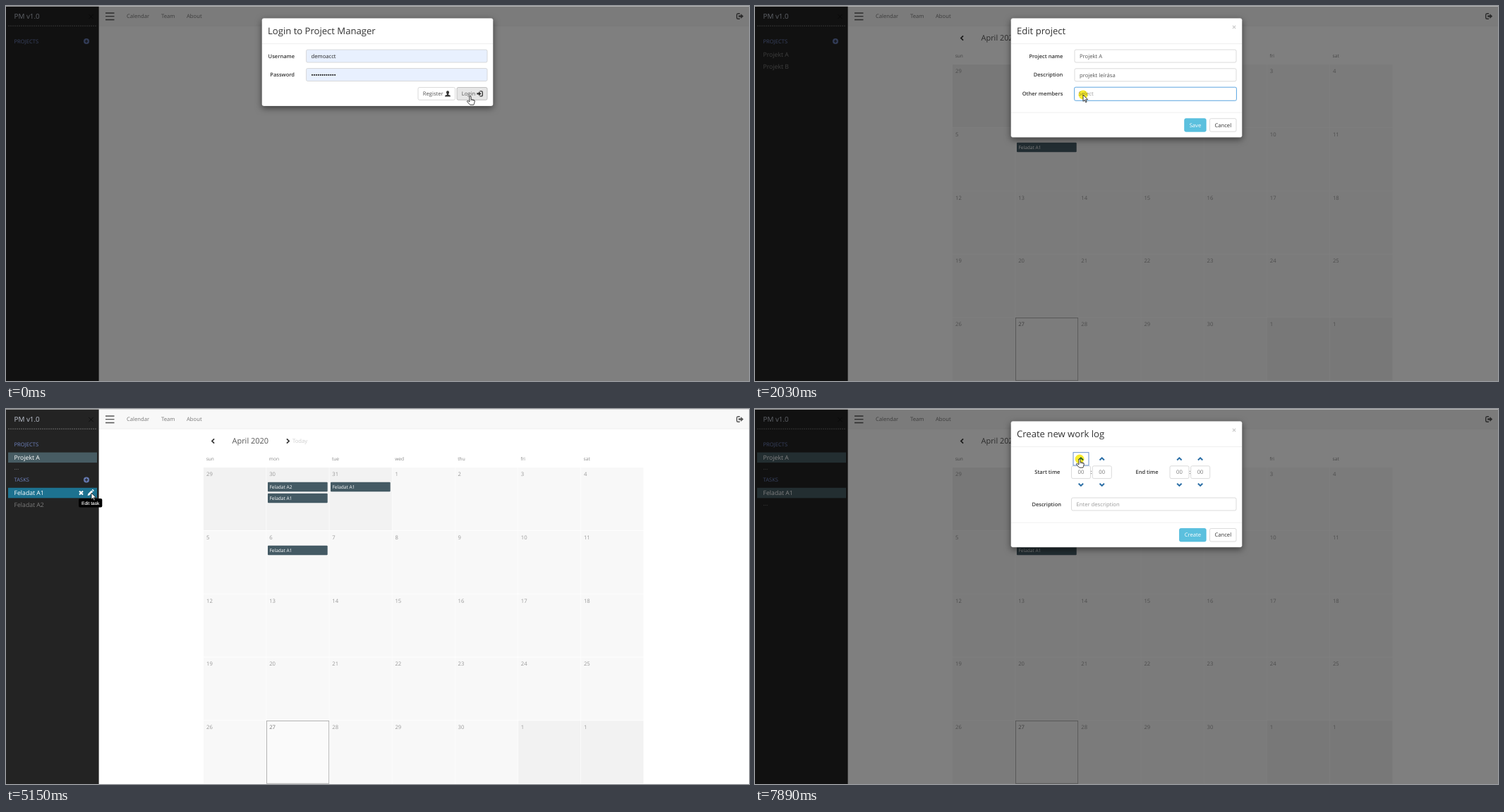
An HTML page for the animation above (8000 ms loop, 1053 by 532 pixels).

```html
<!DOCTYPE html>
<html lang="en">
<head>
<meta charset="utf-8">
<title>Project manager</title>
<style>
html, body { margin: 0; width: 100%; height: 100%; overflow: hidden; background: #fff; }
svg { display: block; width: 1053px; height: 532px; font-family: "Open Sans", sans-serif; text-rendering: geometricPrecision; }
</style>
</head>
<body>
<svg id="stage" viewBox="0 0 1053 532" xmlns="http://www.w3.org/2000/svg"></svg>
<script>
const stage = document.getElementById('stage');
const LOOP = 8000;
const MEMBER = 'tolvidor';

// Screen updates come in bursts: [first, last, number of updates]
const BURSTS = [
  [0, 0, 1], [90, 160, 2], [340, 490, 3], [650, 980, 5], [1120, 1120, 1], [1300, 1700, 6],
  [2030, 2340, 5], [2570, 2970, 6], [3110, 3670, 8], [3820, 3900, 2], [4280, 5070, 11],
  [5150, 5780, 9], [6240, 6870, 9], [7020, 7020, 1], [7180, 7180, 1], [7340, 7890, 8]
];

// Pointer path: time, x, y
const PATH = [
  [0, 658, 128], [570, 658, 128], [980, 121, 69], [1460, 121, 69], [1700, 465, 126],
  [2500, 465, 126], [2810, 478, 145], [3110, 478, 145], [3430, 620, 168], [3510, 620, 168],
  [3670, 60, 70], [4200, 60, 70], [4800, 121, 119], [5465, 121, 119], [5780, 663, 166],
  [6319, 663, 166], [6476, 644, 169], [6634, 60, 119], [6715, 60, 119], [6870, 495, 222],
  [7497, 495, 222], [7811, 460, 71]
];
const CLICKS = [[90, 160], [1120, 1300], [2030, 2180], [2880, 2960], [3820, 3890], [4900, 5060],
  [6240, 6310], [6700, 6780], [7020, 7180], [7880, 8000]];
const HANDS = [[0, 640], [2800, 3580], [3670, 4280], [5700, 6390], [6630, 6780], [7800, 8000]];

const clamp = v => Math.max(0, Math.min(1, v));
const within = (list, t) => list.some(([a, b]) => t >= a && t < b);

function screenTime(t) {
  const [from, to, n] = BURSTS.filter(b => b[0] <= t).pop();
  if (n === 1) return from;
  const step = (to - from) / (n - 1);
  return from + Math.min(n - 1, Math.floor((t - from + 10) / step)) * step;
}

function pointerAt(t) {
  const i = PATH.findIndex(p => p[0] > t);
  if (i < 0) return PATH[PATH.length - 1].slice(1);
  const [t0, x0, y0] = PATH[i - 1], [t1, x1, y1] = PATH[i];
  const u = (t - t0) / (t1 - t0), e = u * u * (3 - 2 * u);
  return [x0 + (x1 - x0) * e, y0 + (y1 - y0) * e];
}

// y is the visual middle of the line
const text = (x, y, s, size = 7.68, fill = '#555', more = '') =>
  `<text x="${x}" y="${y + size * 0.35}" font-size="${size}" fill="${fill}" ${more}>${s}</text>`;
const rect = (x, y, x2, y2, fill, more = '') =>
  `<rect x="${x}" y="${y}" width="${x2 - x}" height="${y2 - y}" fill="${fill}" ${more}/>`;
const line = (d, stroke, w = 1, more = '') =>
  `<path d="${d}" fill="none" stroke="${stroke}" stroke-width="${w}" ${more}/>`;
const at = (x, y, body, more = '') => `<g transform="translate(${x} ${y})" ${more}>${body}</g>`;
const label = (x, y, s) => text(x, y, s, 7.5, '#333', 'font-weight="600" text-anchor="end"');
const box = (x, y, x2, y2, fill = '#fff', stroke = '#ccc') =>
  rect(x, y, x2, y2, fill, `stroke="${stroke}" stroke-width=".7" rx="2"`);
const field = (x, y, s, fill = '#555', bg = '#fff') => box(x, y, 682, y + 18, bg) + text(x + 7, y + 9.2, s, 7.68, fill);
const button = (x, y, x2, s, bg = '#fff', edge = '#ccc', ink = '#333') =>
  box(x, y, x2, y + 18.5, bg, edge) + text((x + x2) / 2, y + 9.2, s, 7.68, ink, 'text-anchor="middle"');
const cancel = (y, hot) => button(644.5, y, 682, 'Cancel', hot ? '#e6e6e6' : '#fff', hot ? '#adadad' : '#ccc');

const CROSS = line('M-2.5-2.5 2.5 2.5M-2.5 2.5 2.5-2.5', '#fff', 2.1);
const PENCIL = '<path fill="#fff" d="M-3.8 3.9l.6-2.7L1.6-3.6l2.1 2.1-4.8 4.8zM2.3-4.2l2.1 2.1.6-.7q.3-.4 0-.8l-1.3-1.3q-.4-.3-.8 0z"/>';
const USER = '<path fill="#333" d="M0-4.2q2 0 2 2.2 0 1.8-1 2.6v.7l2.8 1.2V4h-7.6V2.5L-1 1.3V.6q-1-.8-1-2.6 0-2.2 2-2.2z"/>';
const HAND = '<path fill="#fff" stroke="#111" stroke-width=".8" stroke-linejoin="round" d="M-1.1 .9a1.1 1.1 0 0 1 2.2 0V4.4l4 .9q1.3.4 1.2 1.8l-.7 3.2-.8 1.9H-.3L-4.4 7.8q-.5-1.3.8-1.4l2.5 1.5Z"/>'
  + line('M1.1 4.4V6.6M3 4.9V6.8M4.8 5.4V7', '#111', .5);
const ARROW = '<path fill="#fff" stroke="#111" stroke-width=".8" d="M0 0V9.3l2.2-2 1.5 3.4 1.4-.6-1.5-3.3H6.6Z"/>';

const chevron = (x, y, d, ink, w = 1.7) => at(x, y, line(d, ink, w));
const plus = y => at(114, y, `<circle r="4" fill="#6478b0"/>` + line('M-2.2 0H2.2M0-2.2V2.2', '#222', 1.2));

function topBar() {
  return rect(131.5, 0, 1053, 28, '#f8f8f8') + rect(131.5, 27.8, 1053, 28.4, '#e7e7e7')
    + line('M141 10H153.5M141 14.7H153.5M141 19.5H153.5', '#555', 1.3)
    + text(171, 14.3, 'Calendar', 7.68, '#777') + text(220, 14.3, 'Team', 7.68, '#777') + text(256, 14.3, 'About', 7.68, '#777')
    + at(1040, 14.5, line('M0-3.8H-2.6Q-4.3-3.8-4.3-2V2Q-4.3 3.8-2.6 3.8H0', '#555', 1.4)
      + '<path fill="#555" d="M-1.8-1.3H1.4V-3.6L5.2 0 1.4 3.6V1.3H-1.8z"/>');
}

function calendar() {
  const W = 89.15, H = 89.8;
  let s = chevron(293.5, 45.5, 'M1.6-3.2-1.6 0 1.6 3.2', '#333') + text(320.5, 45.3, 'April 2020', 10.96, '#555')
    + chevron(399.5, 45.5, 'M-1.6-3.2 1.6 0-1.6 3.2', '#333') + text(406, 45.3, 'Today', 7.68, '#ccc');
  ['sun', 'mon', 'tue', 'wed', 'thu', 'fri', 'sat'].forEach((d, i) => s += text(283.7 + W * i, 71, d, 6.58, '#888'));
  for (let i = 0; i < 35; i++) {
    const x = 280 + W * (i % 7), y = 83 + H * Math.floor(i / 7);
    const outside = i < 3 || i > 32, today = i === 29;
    const day = i < 3 ? 29 + i : i > 32 ? 1 : i - 2;
    s += rect(x, y, x + W - .6, y + H - .8, outside ? '#f2f2f2' : '#f8f8f8');
    if (today) s += rect(369.5, 442.5, 457.7, 531.3, '#fafafa', 'stroke="#aaa" stroke-width=".9"');
    s += text(x + 4, y + 9.4, day, 7.68, today ? '#777' : '#999');
  }
  const task = (x, y, name) => rect(x, y, x + 84.7, y + 13.5, '#445a64', 'rx="1"') + text(x + 2.4, y + 6.8, name, 6.58, '#fff');
  return s + task(371, 103.8, 'Feladat A2') + task(371, 119.7, 'Feladat A1') + task(460, 103.8, 'Feladat A1') + task(371, 193.8, 'Feladat A1');
}

function row(y, name, mode) {
  const bg = { hover: '#1d7290', on: '#475c63' }[mode];
  return (bg ? rect(3, y - 7.2, 129, y + 7.3, bg) : '')
    + text(11.5, y, name, 8.7, bg ? '#fff' : '#7b7b7b')
    + (mode === 'hover' ? at(106.5, y, CROSS) + at(119.5, y, PENCIL) : '');
}
const tip = (x, x2, y, s) => rect(x, y, x2, y + 12.6, '#000', 'rx="2"')
  + text((x + x2) / 2, y + 6.2, s, 6.6, '#fff', `text-anchor="middle" font-family="Liberation Sans, sans-serif" stroke="#fff" stroke-width=".12"`);

function sidebar(t) {
  const inProject = t >= 3820, inTask = t >= 6700;
  const head = (y, s) => text(11.5, y, s, 7.6, '#6f83c0');
  const dots = y => text(11.5, y, '...', 8.7, '#7b7b7b');
  let s = rect(0, 0, 131.6, 532, '#232323') + text(11.5, 14.8, 'PM v1.0', 9.87, '#c0c6d2')
    + at(120.5, 15, line('M-3.2-3.2 3.2 3.2M-3.2 3.2 3.2-3.2', '#0c0c0c', .9))
    + line('M3 28.2H129', '#8a8a8a', .7, 'stroke-dasharray="2 1"') + head(50, 'PROJECTS');
  if (!inProject) {
    s += plus(50);
    if (t >= 340) {
      const hot = within([[890, 1370], [3660, 3820]], t);
      s += row(68.8, 'Projekt A', hot ? 'hover' : '') + row(85.8, 'Projekt B');
    }
    return s;
  }
  s += row(68.8, 'Projekt A', 'on') + dots(83) + head(100.5, 'TASKS');
  if (inTask) return s + row(119, 'Feladat A1', 'on') + dots(133.5);
  const hot = within([[4580, 5220], [6625, 6700]], t);
  return s + plus(100.5) + row(119, 'Feladat A1', hot ? 'hover' : '') + row(136, 'Feladat A2');
}

function frame(title, bottom, closeInk) {
  return rect(362.6, 17.3, 690.4, bottom, '#fff', 'rx="3" stroke="#000" stroke-opacity=".25" stroke-width=".6" style="filter:drop-shadow(0 3px 5px rgba(0,0,0,.5))"')
    + text(371, 35, title, 13.1, '#333') + rect(363, 53, 690, 53.6, '#e5e5e5')
    + (closeInk ? text(679, 30.2, '×', 11.5, closeInk, 'font-weight="700" text-anchor="middle"') : '');
}
const divider = y => rect(363, y, 690, y + .6, '#e5e5e5');

function loginForm(t) {
  const down = t >= 90 && t < 160;
  let s = frame('Login to Project Manager', 142) + label(409, 71, 'Username') + label(409, 97.7, 'Password')
    + field(425.5, 62, 'demoacct', '#222', '#e8f0fe') + field(425.5, 88.5, '', '#222', '#e8f0fe');
  for (let i = 0; i < 12; i++) s += `<circle cx="${434 + 2.92 * i}" cy="97.8" r="1.1" fill="#222"/>`;
  return s + box(584, 115.5, 636.5, 133.3) + text(590.7, 124.4, 'Register') + at(626, 124.4, USER)
    + box(639, 115.5, 682, 133.3, down ? '#d4d4d4' : '#e6e6e6', t >= 90 ? '#8c8c8c' : '#adadad') + text(645.7, 124.4, 'Login')
    + at(671.5, 124.4, line('M0-3.5H2.3Q3.8-3.5 3.8-2V2Q3.8 3.5 2.3 3.5H0', '#333', 1.3)
      + '<path fill="#333" d="M-4.2-1.2H-1.5V-3.2L2 0-1.5 3.2V1.2H-4.2z"/>');
}

function editForm(kind, name, about, focused, saveHot, cancelHot) {
  return frame('Edit ' + kind.toLowerCase(), 186.4, focused ? '#7f7f7f' : '#ccc')
    + label(436.3, 71, kind + ' name') + label(436.3, 97.7, 'Description') + label(436.3, 124.6, 'Other members')
    + field(453, 62, name) + field(453, 88.8, about) + box(453, 115.6, 682, 134, '#fff', '#ddd') + divider(150.8)
    + button(608.7, 159.7, 639.2, 'Save', saveHot ? '#31b0d5' : '#5bc0de', saveHot ? '#269abc' : '#46b8da', '#fff')
    + cancel(159.7, cancelHot);
}
const placeholder = text(458.5, 124.7, 'Select', 7.68, '#999');

function projectForm(t) {
  let s = editForm('Project', 'Projekt A', 'projekt leírása', t < 2030, t >= 3340);
  if (t >= 3110) {
    return s + rect(456, 118.4, 498, 131.8, '#ebebeb', 'rx="1.5"') + text(459, 125, MEMBER)
      + at(492, 125, line('M-2.2-2.2 2.2 2.2M-2.2 2.2 2.2-2.2', '#999', .8));
  }
  if (t >= 2030) s += rect(452.5, 115.2, 682.5, 134.3, 'none', 'rx="2" stroke="#66afe9" stroke-width="1"');
  if (t >= 2100) s += box(453, 134.3, 682, 150.5) + rect(453.5, 135, 681.5, 150, '#f0f0f0') + text(458.5, 142.6, MEMBER);
  return s + placeholder;
}

const taskForm = t => editForm('Task', 'Feladat A1', 'feladat leírása', true, false, t >= 5700) + placeholder;

function logForm(t) {
  let s = frame('Create new work log', 196.2, t < 7880 ? '#7f7f7f' : '#ccc')
    + label(432.4, 89, 'Start time') + label(571.6, 89, 'End time') + label(434, 135, 'Description');
  [448.5, 478.3, 588, 617.7].forEach((x, i) => {
    const mid = x + 13.4;
    s += box(x, 80.8, x + 27, 98.6) + text(mid, 89.8, '00', 7.68, '#777', 'text-anchor="middle"')
      + chevron(mid, 70.8, 'M-3.2 1.7 0-1.5 3.2 1.7', '#2a6ea6', 2) + chevron(mid, 107.4, 'M-3.2-1.7 0 1.5 3.2-1.7', '#2a6ea6', 2);
    if (i % 2) s += text(x - 1.5, 89.3, ':', 7.68, '#333', 'text-anchor="middle"');
  });
  if (t >= 7880) s += rect(451, 61.7, 473, 80, 'none', 'stroke="#5a86c8" stroke-width=".9"');
  return s + field(448.5, 126, 'Enter description', '#999') + divider(160.8)
    + button(601.5, 169.5, 639.2, 'Create', '#5bc0de', '#46b8da', '#fff') + cancel(169.5);
}

// form, opening time, closing time
const DIALOGS = [[loginForm, -500, 260], [projectForm, 1330, 3430], [taskForm, 5230, 6240], [logForm, 7310, 9000]];

function dialogs(t) {
  return DIALOGS.map(([form, open, close]) => {
    const up = t - open, gone = Math.max(0, t - close);
    if (up <= 0 || gone >= 220) return '';
    const dim = Math.min(clamp(up / 150), 1 - clamp((gone - 110) / 110));
    const alpha = Math.min(clamp(up / 150), 1 - clamp(gone / 110));
    const lift = 45 * (1 - clamp(up / 300)) ** 2 + gone * .15;
    return rect(0, 0, 1053, 532, '#000', `opacity="${dim / 2}"`) + at(0, -lift, form(t), `opacity="${alpha}"`);
  }).join('');
}

function pointer(t) {
  const [x, y] = pointerAt(t);
  const glow = within(CLICKS, t) ? '<circle r="6.5" fill="#f8ec30" style="mix-blend-mode:multiply"/>' : '';
  return at(x, y, glow + (within(HANDS, t) ? HAND : ARROW));
}

function draw(t) {
  stage.innerHTML = rect(0, 0, 1053, 532, '#fff') + topBar() + (t >= 340 ? calendar() : '') + sidebar(t)
    + (within([[970, 1370]], t) ? tip(99, 140, 76.5, 'Edit project') : '')
    + (within([[4800, 5220]], t) ? tip(103, 136.3, 127, 'Edit task') : '')
    + dialogs(t) + rect(0, 0, 1053, .7, '#ccc') + pointer(t);
}

let shown = -1;
function tick() {
  const t = screenTime(performance.now() % LOOP);
  if (t !== shown) draw(shown = t);
  requestAnimationFrame(tick);
}
tick();
</script>
</body>
</html>
```
